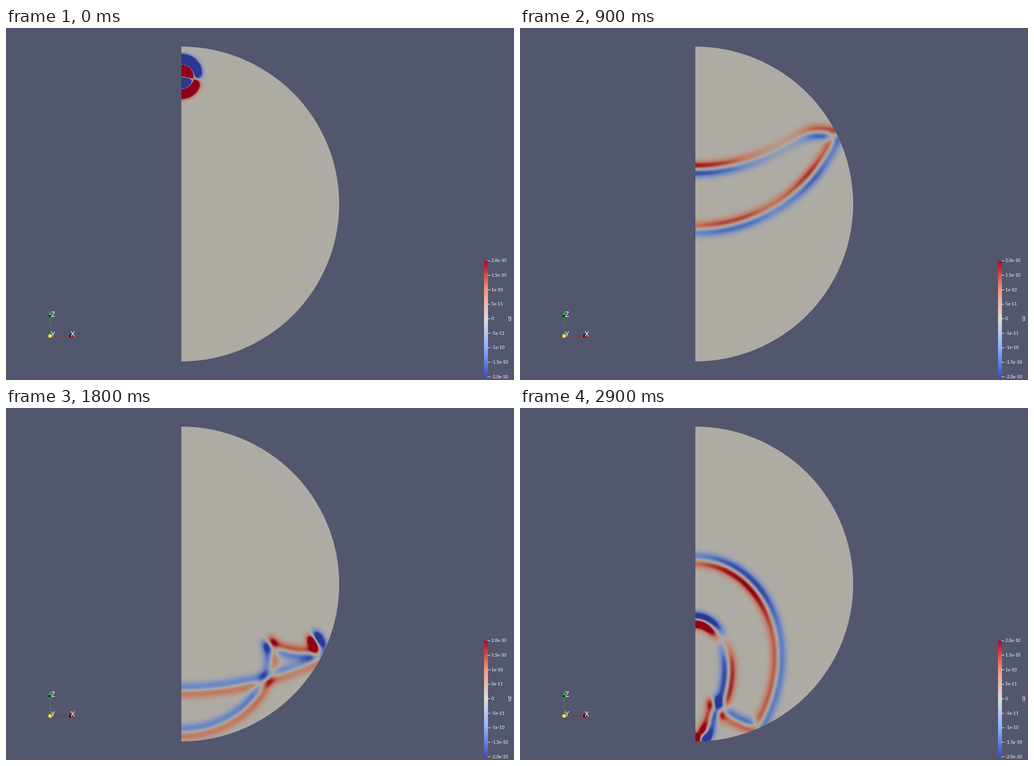
An HTML page with a canvas for the animation above (3000 ms loop, 898 by 623 pixels).

```html
<!DOCTYPE html>
<html lang="en">
<head>
<meta charset="utf-8">
<title>Wave field in a sphere</title>
<style>
  html, body { margin: 0; width: 100%; height: 100%; overflow: hidden; background: #52576e; }
  svg, canvas { position: absolute; left: 0; top: 0; }
  canvas { left: 309.5px; top: 33px; border-radius: 0 279px 279px 0 / 0 278.5px 278.5px 0; }
  text { fill: #fff; font-family: Lato, "Open Sans", sans-serif; font-size: 7.7px; }
  .axis { font: 12px "Liberation Sans", Arial, sans-serif; }
</style>
</head>
<body>
<svg width="898" height="623" viewBox="0 0 898 623">
  <defs>
    <linearGradient id="scale" x1="0" y1="0" x2="0" y2="1">
      <stop offset="0" stop-color="#b40426"/>
      <stop offset=".25" stop-color="#f4987a"/>
      <stop offset=".5" stop-color="#dddddd"/>
      <stop offset=".75" stop-color="#8db0fe"/>
      <stop offset="1" stop-color="#3b4cc0"/>
    </linearGradient>
  </defs>
  <rect x="845" y="412" width="7" height="206" fill="url(#scale)"/>
  <g id="ticks"></g>
  <text transform="translate(893 519) rotate(-90)" style="font-size:9px">uz</text>

  <path d="M78 545V510" stroke="#1f9a35"/>
  <path d="M78 545H113" stroke="#a02a38"/>
  <path d="M74.5 511L78 501.5L81.5 511Z" fill="#00d816"/>
  <path d="M75 508.5H81V511H75Z" fill="#101810"/>
  <path d="M112.5 541.5L122 545L112.5 548.5Z" fill="#d80000"/>
  <path d="M112 542H114.5V548H112Z" fill="#180808"/>
  <circle cx="78" cy="545" r="3.2" fill="#f4ee10"/>
  <text class="axis" x="79.5" y="510.5">Z</text>
  <text class="axis" x="79" y="546">Y</text>
  <text class="axis" x="114" y="545.5">X</text>
</svg>
<canvas id="field" width="279" height="557"></canvas>

<script>
const labels = ['2.0e-10', '1.5e-10', '1e-10', '5e-11', '0', '-5e-11', '-1e-10', '-1.5e-10', '-2.0e-10'];
document.getElementById('ticks').innerHTML = labels.map((label, i) => {
  const y = 412 + i * 25.65;
  return `<path d="M851 ${y}H856" stroke="#fff" stroke-width=".9"/><text x="858" y="${y + 2.4}">${label}</text>`;
}).join('');

const canvas = document.getElementById('field');
const ctx = canvas.getContext('2d');
const { width: W, height: H } = canvas;
const image = ctx.createImageData(W, H);
const field = new Float32Array(W * H);

const RADIUS = 278.5, EMITTER_Y = -223.5, SPEED = 0.2775, START = 18.5;
const SIGMA = 7, REACH = 24, RAYS = 720, LOOP = 3000, STEP = 100;

// Pulse strength in tenths, per 10 degrees of take-off angle (0 = straight down).
const times = [0, 400, 900, 1400, 1800, 2200, 2900];
const strengths = [
  Array.from({ length: 19 }, (_, i) => 18 * Math.cos(i * Math.PI / 18) - 1.5),
  [18, 16, 12, 7, 4.5, 2, -2, -5, -6, -7, -11, -15, -14, -14, -15, -15, -16, -17, -18],
  [-5, -7, -7, -5, -6, -8, -5.5, -7, -7, -5, -3, -2.5, -2, -2, -3, -4.5, -6.5, -8, -9],
  [-5, -5.5, -6.5, -4, -7, -13, -5, 0, 1, 2, 3, 4, 5, 5, 5, 5.5, 5.5, 5.5, 6],
  [-5, -5, -6, -4, -8, -8, -5, -6, -6, 8, 12, 10, 10, 6, 4, 5, 5, 5, 5],
  [-8, -11, -12, -9, -8, -6, -6, -5, -7, 1, 3, 4, 4, 5, 6, 5, 6, 6, 6],
  [-5, -9, -10, -6, -6, -6, -5, -6, -8, -12, -14, -6, 5, 9, 8, 1, -12, -15, -16]
];
const palette = [[44, 56, 146], [108, 136, 198], [174, 171, 164], [192, 121, 97], [142, 2, 24]];

const mix = (a, b, k) => a + (b - a) * k;

function sample(row, angle) {
  const p = Math.abs(angle) * 18 / Math.PI, i = Math.min(17, Math.floor(p));
  return mix(row[i], row[i + 1], p - i);
}

function strength(angle, t) {
  let k = 0;
  while (k < times.length - 2 && t >= times[k + 1]) k++;
  const u = (t - times[k]) / (times[k + 1] - times[k]);
  return mix(sample(strengths[k], angle), sample(strengths[k + 1], angle), u) / 10;
}

// Follow one ray from the emitter, bouncing off the sphere.
function trace(angle, length) {
  let x = 0, y = EMITTER_Y, dx = Math.sin(angle), dy = Math.cos(angle);
  for (;;) {
    const b = x * dx + y * dy;
    const chord = -b + Math.sqrt(Math.max(0, b * b - x * x - y * y + RADIUS * RADIUS));
    if (length <= chord) return { x: x + dx * length, y: y + dy * length, dx, dy };
    x += dx * chord;
    y += dy * chord;
    length -= chord;
    const turn = 2 * (x * dx + y * dy) / (RADIUS * RADIUS);
    dx -= turn * x;
    dy -= turn * y;
  }
}

// Add a Gaussian blob differentiated along the ray.
function splat(p, amount) {
  const px = p.x, py = p.y + RADIUS;
  const x0 = Math.max(0, Math.floor(px - REACH)), x1 = Math.min(W - 1, Math.ceil(px + REACH));
  const y0 = Math.max(0, Math.floor(py - REACH)), y1 = Math.min(H - 1, Math.ceil(py + REACH));
  for (let y = y0; y <= y1; y++) {
    const v = y + 0.5 - py;
    for (let x = x0; x <= x1; x++) {
      const u = x + 0.5 - px;
      field[y * W + x] += amount * (u * p.dx + v * p.dy) * Math.exp(-(u * u + v * v) / (2 * SIGMA * SIGMA));
    }
  }
}

function draw(t) {
  const distance = START + SPEED * t;
  const gain = Math.max(1, 130 / distance) * Math.exp(0.5) / (SIGMA * SIGMA * Math.sqrt(2 * Math.PI));
  const angleOf = i => (2 * i / RAYS - 1) * Math.PI;
  const front = Array.from({ length: RAYS + 1 }, (_, i) =>
    trace(angleOf(i), distance + 2 * (1 - Math.cos(angleOf(i)))));

  field.fill(0);
  for (let i = 0; i < RAYS; i++) {
    const p = front[i], q = front[i + 1];
    if (p.x < -REACH) continue;
    splat(p, strength(angleOf(i), t) * gain * Math.hypot(q.x - p.x, q.y - p.y));
  }

  for (let i = 0; i < field.length; i++) {
    const c = 2 + 2 * Math.max(-1, Math.min(1, field[i]));
    const k = Math.min(3, Math.floor(c));
    for (let j = 0; j < 3; j++) image.data[i * 4 + j] = mix(palette[k][j], palette[k + 1][j], c - k);
    image.data[i * 4 + 3] = 255;
  }
  ctx.putImageData(image, 0, 0);
}

let shown = -1;
function tick() {
  const t = Math.floor(performance.now() % LOOP / STEP) * STEP;
  if (t !== shown) draw(shown = t);
  requestAnimationFrame(tick);
}
tick();
</script>
</body>
</html>
```
